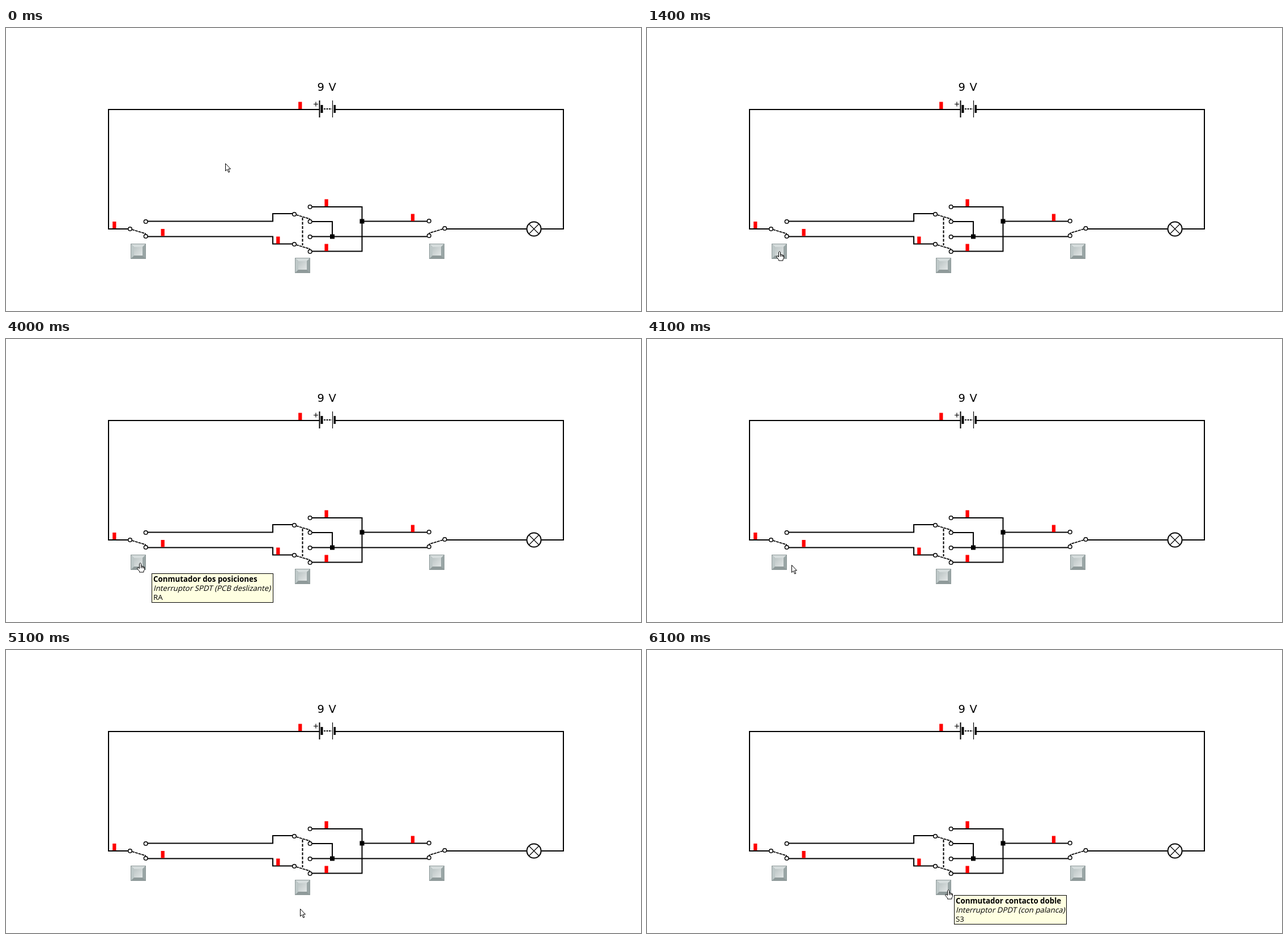
Write an HTML page that moves like this. It is 1121 px wide and 500 px high and loops after 8000 ms.

```html
<!DOCTYPE html>
<html lang="es">
<head>
<meta charset="utf-8">
<title>Circuito conmutado</title>
<style>
  html, body { margin: 0; height: 100%; overflow: hidden; background: #fff; }
  svg { display: block; width: 100vw; height: 100vh; }
  .wire { fill: none; stroke: #000; stroke-width: 2; }
  .thin { fill: none; stroke: #000; stroke-width: 1.2; }
  .arm { stroke: #000; stroke-width: 1.7; stroke-dasharray: 5 1; }
  .link { stroke-dasharray: 5 2.5; }
  .terminal { fill: #fff; stroke: #000; stroke-width: 1.5; }
  .probes { fill: none; stroke: #f00; stroke-width: 6.3; }
  .cursor { fill: #fff; stroke: #000; stroke-linejoin: round; }
  .tip { font: 13.3px "Open Sans", sans-serif; }
  .tip rect { fill: #ffffe1; stroke: #000; }
  .title { font-weight: bold; }
  .volts { font: 19.5px "DejaVu Sans", sans-serif; word-spacing: 1.5px; }
</style>
</head>
<body>
<svg viewBox="0 0 1121 500">
  <defs>
    <linearGradient id="face" x2="1" y2="1">
      <stop stop-color="#bcc5c5"/><stop offset="1" stop-color="#e2e6e6"/>
    </linearGradient>
    <g id="button">
      <path fill="#8f9a9a" d="M0 0H27V27H0Z"/>
      <path fill="#d5dcdc" d="M1 1H26L21 6H6Z"/>
      <path fill="#bec8c8" d="M1 1L6 6V21L1 26Z"/>
      <path fill="#9aa6a6" d="M26 1V26L21 21V6Z"/>
      <path fill="url(#face)" d="M6 6H21V21H6Z"/>
    </g>
  </defs>

  <text class="volts" x="549.5" y="111">9 V</text>
  <path class="wire" d="M553 144H181V355H217M582 144H984V355H945M919 355H776
    M249 341.5H471V328H506M249 368.5H471V381.5H506
    M540 316H628.5V394.5H540M540 342H576V368.5M540 368.5H743M628.5 341.5H743"/>
  <path class="probes" d="M519.3 130.5V143M191.3 342V354M276.7 355V367.5M480.3 368.5V381
    M565.6 302.5V315M565.6 381.5V394M718 328.5V341"/>

  <path class="wire" d="M553.5 128V158"/>
  <path class="thin" d="M576.5 128V158M543 134.5H551M547 130.5V138.5"/>
  <path d="M555.5 136H559.5V150H555.5ZM578.5 136H582V150H578.5Z"/>
  <path class="wire" d="M561 143H575" stroke-dasharray="3 1.5"/>

  <circle class="wire" cx="932" cy="355" r="12.5"/>
  <path class="thin" d="M923.5 346.5l17 17m0-17l-17 17"/>

  <path class="wire link" d="M523.5 335V384"/>
  <path d="M624.5 337.5h8v8h-8ZM572 364.5h8v8h-8Z"/>
  <g id="parts"></g>

  <path id="arrow" class="cursor" d="M.5 .5V13.5L3.5 10.8L5.8 16L7.8 15.2L5.6 10H9.5Z"/>
  <g id="hand" class="cursor">
    <path d="M-1.5 10.5V2Q0 -.8 1.5 2V6.5Q3 5.2 4 7Q5.5 6 6 7.7Q7.5 7 7.5 9V12.5L6 15V17H-1.5V15.3L-5.3 10.7Q-5.5 8.3 -3.3 9Z"/>
    <path fill="none" d="M1.5 6V10M4 7V10M6 7.7V10.3"/>
  </g>
</svg>
<script>
const LOOP = 8000, TICK = 100, BUTTON = 27;
const buttons = [[220, 381], [510, 406], [747, 381]];
const el = id => document.getElementById(id);

const terminal = (x, y) => `<circle class="terminal" cx="${x}" cy="${y}" r="3.3"/>`;

// Pivot, two contacts and the arm resting near the lower one; dir is 1 or -1
const changeover = (x, y, dir) => {
  const reach = x + 27.7 * dir;
  return terminal(x, y) + terminal(reach, y - 13) + terminal(reach, y + 13) +
    `<line class="arm" x1="${x + 3 * dir}" y1="${y + 1}" x2="${x + 28 * dir}" y2="${y + 8.5}"/>`;
};

const tooltip = (id, width, title, detail, label) => `
  <g id="${id}" class="tip">
    <rect x=".5" y=".5" width="${width}" height="51"/>
    <text class="title" x="3" y="15">${title}</text>
    <text transform="translate(3 31) skewX(-13)">${detail}</text>
    <text x="3" y="46.5">${label}</text>
  </g>`;

el('parts').innerHTML =
  changeover(219, 355, 1) + changeover(509, 329, 1) +
  changeover(509, 382, 1) + changeover(774.5, 354, -1) +
  buttons.map(([x, y]) => `<use href="#button" x="${x}" y="${y}"/>`).join('') +
  tooltip('slideTip', 214, 'Conmutador dos posiciones', 'Interruptor SPDT (PCB deslizante)', 'RA') +
  tooltip('leverTip', 198, 'Conmutador contacto doble', 'Interruptor DPDT (con palanca)', 'S3');

// Pointer glides between rests
const home = [387, 239];
const glides = [
  { from: 0, to: 800, x: 189, y: 387 },
  { from: 1000, to: 1400, x: 234, y: 394 },
  { from: 3950, to: 4850, x: 517, y: 461 },
  { from: 5000, to: 5500, x: 532, y: 423 }
];

const ease = (t, from, to) => {
  const k = Math.min(1, Math.max(0, (t - from) / (to - from)));
  return k * k * (3 - 2 * k);
};

const pointerAt = t => glides.reduce(([x, y], g) => {
  const k = ease(t, g.from, g.to);
  return [x + (g.x - x) * k, y + (g.y - y) * k];
}, home).map(Math.round);

const overButton = (x, y) => buttons.some(([bx, by]) =>
  x >= bx && x < bx + BUTTON && y >= by && y < by + BUTTON);

function put(id, visible, x, y) {
  el(id).style.display = visible ? '' : 'none';
  el(id).setAttribute('transform', `translate(${x} ${y})`);
}

function draw(now) {
  const t = Math.floor(now % LOOP / TICK) * TICK;
  const [x, y] = pointerAt(t), hovering = overButton(x, y);
  put('hand', hovering, x, y);
  put('arrow', !hovering, x, y);
  const [tipX, tipY] = t < 4000 ? [243, 403] : [257, 414];
  put('slideTip', t >= 2200 && t < 4100, tipX, tipY);
  put('leverTip', t >= 6100, 542, 433);
}

const start = performance.now();
function frame() {
  draw(performance.now() - start);
  requestAnimationFrame(frame);
}
frame();
</script>
</body>
</html>
```
